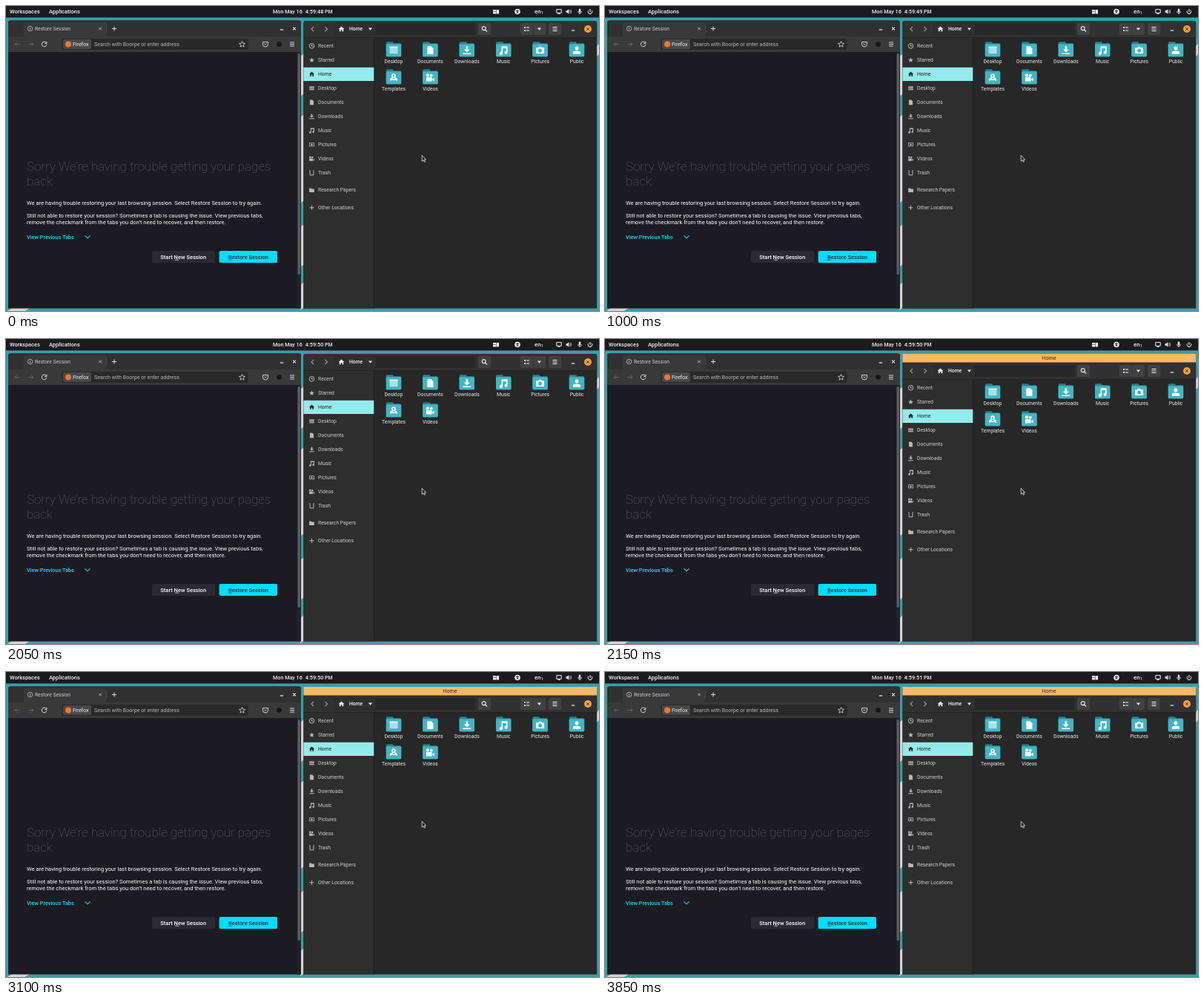
Recreate the animation shown at these times as an HTML page with a canvas. Size 800 by 411 pixels, loop 4.5 s.

```html
<!DOCTYPE html>
<html lang="en">
<head>
<meta charset="utf-8">
<title>Desktop with stacking windows</title>
<style>
html, body { margin: 0; width: 100%; height: 100%; overflow: hidden; background: #1b1a1c; }
canvas { display: block; }
</style>
</head>
<body>
<canvas id="stage" width="800" height="411"></canvas>
<script>
const ctx = document.getElementById('stage').getContext('2d');
const LOOP = 4500;
const STACK_AT = 2150;
const TAB_HEIGHT = 12;
const BOTTOM = 407.6, LEFT = 401.4, RIGHT = 797.2;
const WHITE = '#f2f2f2', SOFT = '#c9c9c9', TEAL = '#3a9dab', PALE = '#d3d3d4', CYAN = '#00ddff';
const BUTTON = '#414141', SIDEBAR = '#2e2e2e';

function rect(x, y, w, h, color, radius = 0) {
  ctx.fillStyle = color;
  ctx.beginPath();
  ctx.roundRect(x, y, w, h, radius);
  ctx.fill();
}

function disc(x, y, r, color) {
  ctx.fillStyle = color;
  ctx.beginPath();
  ctx.arc(x, y, r, 0, Math.PI * 2);
  ctx.fill();
}

function text(str, x, y, size, color, weight = 400, align = 'left') {
  ctx.font = `${weight} ${size}px Roboto, sans-serif`;
  ctx.textAlign = align;
  ctx.textBaseline = 'alphabetic';
  ctx.fillStyle = color;
  ctx.fillText(str, x, y);
}

// Paths are drawn around their own centre.
function at(x, y, draw) {
  ctx.save();
  ctx.translate(x, y);
  draw();
  ctx.restore();
}

function solid(path, x, y, color, scale = 1) {
  at(x, y, () => {
    ctx.scale(scale, scale);
    ctx.fillStyle = color;
    ctx.fill(new Path2D(path), 'evenodd');
  });
}

function line(path, x, y, color, width = 1) {
  at(x, y, () => {
    ctx.strokeStyle = color;
    ctx.lineWidth = width;
    ctx.stroke(new Path2D(path));
  });
}

const shapes = {
  home: 'M0 -4L4.2 0H3V3.6H1V1H-1V3.6H-3V0H-4.2Z',
  star: 'M0 -4L1.2 -1.3L4 -1.1L1.8 .8L2.5 3.6L0 2.1L-2.5 3.6L-1.8 .8L-4 -1.1L-1.2 -1.3Z',
  list: 'M-4 -3H4V-1.6H-4ZM-4 -.8H4V.6H-4ZM-4 1.4H4V3H-4Z',
  page: 'M-3 -4H.8L3 -1.8V4H-3Z',
  download: 'M-1 -4H1V-.8H3L0 2L-3 -.8H-1ZM-4 2.8H4V4H-4Z',
  music: 'M-2 -4L4 -4V2A1.5 1.5 0 1 1 2.8 .7V-2H-.8V3A1.6 1.6 0 1 1 -2 1.6Z',
  picture: 'M-4 -3H4V3H-4ZM-3 -2V2H3V-2ZM0 -1.5A1.5 1.5 0 1 0 .01 -1.5Z',
  camera: 'M-4 -2.6H-1.8L-1 -3.6H1L1.8 -2.6H4V3.2H-4ZM0 -1.6A1.9 1.9 0 1 0 .01 -1.6Z',
  video: 'M-4 -.5H1.6V3.6H-4ZM2 1.3L4 0V3.4L2 2.2ZM-2.5 -4A1.6 1.6 0 1 0 -2.49 -4ZM1 -3.6A1.4 1.4 0 1 0 1.01 -3.6Z',
  folder: 'M-4 -3.2H-.8L.2 -2.2H4V3.2H-4Z',
  person: 'M0 -4A1.9 1.9 0 1 0 .01 -4ZM-3.8 3.8V2.3Q-3.8 .6 0 .6Q3.8 .6 3.8 2.3V3.8Z',
  down: 'M-2.6 -1.4H2.6L0 1.8Z',
  chevronLeft: 'M1.5 -3L-1.5 0L1.5 3',
  chevronRight: 'M-1.5 -3L1.5 0L-1.5 3',
  cross: 'M-1.8 -1.8L1.8 1.8M1.8 -1.8L-1.8 1.8',
  plus: 'M-3 0H3M0 -3V3',
  menu: 'M-3 -2.5H3M-3 0H3M-3 2.5H3',
  minus: 'M-2.2 0H2.2',
  clock: 'M3.3 0A3.3 3.3 0 1 1 0 -3.3A3.3 3.3 0 0 1 3.3 0M0 -2V.3H2',
  trash: 'M-3.4 -3H-2.4V3H2.4V-3H3.4',
  lens: 'M-.8 -3.4A2.5 2.5 0 1 0 -.79 -3.4M1 1L3.6 3.6',
  compass: 'M0 -4.6A2.1 2.1 0 1 0 .01 -4.6M-1.2 -.6L-4.6 3.8M1.2 -.6L4.6 3.8M-4.6 1.4Q0 3.8 4.6 1.4'
};

function wallpaper() {
  rect(0, 0, 800, 411, TEAL);
  solid('M0 0H24L14 6H-10Z', 10, 406, PALE);
  for (const [y, h] of [[64, 54], [146, 116], [294, 54], [372, 34]]) {
    solid(`M-2 4L3 0V${h}L-2 ${h + 4}Z`, 399, y, PALE);
  }
  solid('M0 4L4 0V14L0 18Z', 797, 50, PALE);
}

function topBar(second) {
  rect(0, 0, 800, 15.5, '#1b1a1c');
  text('Workspaces', 5, 10, 7.4, WHITE, 500);
  text('Applications', 58, 10, 7.5, WHITE, 500);
  text('Mon May 16', 360, 10, 7.2, WHITE, 500);
  text(`4:59:${second}`, 403.7, 10, 7.3, WHITE, 500);
  text('PM', 430, 10, 6.9, WHITE, 500);

  rect(657, 5, 4, 2.5, WHITE);
  rect(657, 8, 4, 2.5, WHITE);
  rect(661.5, 5, 3.5, 5.5, WHITE);
  disc(690, 7.5, 3.8, WHITE);
  line('M-2.2 -.9H2.2M0 -2.4V.8M0 .5L-1.3 2.5M0 .5L1.3 2.5', 690, 7.5, '#1b1a1c', .9);
  text('en', 713, 10, 7.8, WHITE, 500);
  text('1', 721.8, 11.3, 5, WHITE, 500);
  line('M-3.2 -2.7H3.2V2H-3.2ZM-1.5 3.2H1.5', 746, 7.3, WHITE);
  solid('M-3.5 -1.2H-2L.3 -3.2V3.2L-2 1.2H-3.5Z', 759, 7.5, WHITE);
  line('M1.5 -1.8Q2.8 0 1.5 1.8M2.7 -2.8Q4.8 0 2.7 2.8', 759, 7.5, WHITE, .7);
  rect(772.7, 3.6, 2.6, 5, WHITE, 1.3);
  line('M-2.4 0Q-2.4 2.4 0 2.4Q2.4 2.4 2.4 0M0 2.4V4', 774, 7.3, WHITE, .8);
  line('M-1.8 -2A2.8 2.8 0 1 0 1.8 -2M0 -3.6V0', 788, 7.7, WHITE);
}

function browser() {
  rect(3, 19.6, 395, BOTTOM - 19.6, '#1c1b22', [3, 3, 0, 0]);
  rect(3, 19.6, 395, 22, '#303030', [3, 3, 0, 0]);
  rect(24, 22, 111, 19, '#393939', 2);
  rect(3, 41, 395, 21, '#393939');
  line('M3.2 0A3.2 3.2 0 1 1 0 -3.2A3.2 3.2 0 0 1 3.2 0M0 -.5V1.8M0 -1.8V-1', 32.5, 30.5, SOFT, .8);
  text('Restore Session', 39, 33, 6.7, SOFT);
  line(shapes.cross, 127, 30.5, SOFT, .8);
  rect(135, 25, 1, 11, '#484848');
  line(shapes.plus, 146, 30.5, '#dedede');
  line(shapes.minus, 372, 32, WHITE, 1.2);
  line(shapes.cross, 389, 30.5, WHITE, 1.2);

  line('M3.5 0H-3.5M-.5 -3L-3.5 0L-.5 3', 15.5, 51.5, '#676767', .9);
  line('M-3.5 0H3.5M.5 -3L3.5 0L.5 3', 33.5, 51.5, '#676767', .9);
  line('M2.4 -2.4A3.3 3.3 0 1 0 3.3 .4M3.4 -3.6V-1H.8', 51.5, 51.5, '#dedede');

  rect(75.5, 44, 251, 15, '#292929', 2);
  rect(77, 45, 38, 13, '#484848', 2);
  disc(84, 51.5, 4, '#f4742b');
  text('Firefox', 90, 54, 7, WHITE);
  text('Search with Boorpe or enter address', 119, 54, 7.13, '#b5b5b5');
  line(shapes.star, 318.5, 51.5, '#dedede', .8);
  line('M-3.5 -3H3.5V0A3.5 3.5 0 0 1 -3.5 0ZM-1.7 -1L0 .7L1.7 -1', 350, 51.5, '#dedede', .9);
  disc(368.5, 51.5, 3.3, '#151515');
  line(shapes.menu, 386, 51.5, '#dedede');

  text('Sorry We\u2019re having trouble getting your pages', 28, 222, 16.95, '#606068', 100);
  text('back', 28, 242, 16.95, '#606068', 100);

  const body = '#fbfbfe';
  text('We are having trouble restoring your last browsing session. Select Restore Session to try again.', 28, 268, 7.55, body);
  text('Still not able to restore your session? Sometimes a tab is causing the issue. View previous tabs,', 28, 285, 7.55, body);
  text('remove the checkmark from the tabs you don\u2019t need to recover, and then restore.', 28, 294, 7.55, body);
  text('View Previous Tabs', 28, 313.5, 7.3, CYAN, 500);
  line('M-3.5 -1.7L0 1.8L3.5 -1.7', 110, 311, CYAN, 1.1);

  rect(197, 330, 85, 16, '#2b2a33', 2);
  text('Start New Session', 239.2, 340.7, 7.5, body, 500, 'center');
  rect(228, 341.8, 5, .7, body);
  rect(287.6, 330, 78.4, 16, CYAN, 2);
  text('Restore Session', 327, 340.7, 7.45, '#2b2a33', 500, 'center');
  rect(300, 341.8, 4.5, .7, '#2b2a33');

  rect(392.5, 62, 5.5, BOTTOM - 62, '#222127');
  rect(393.5, 64, 3.5, 298, '#5b5b60', 1.7);
}

const places = [
  ['Recent', 'clock', 53.5], ['Starred', 'star', 72.5], ['Home', 'home', 91.5],
  ['Desktop', 'list', 110.5], ['Documents', 'page', 129.5], ['Downloads', 'download', 148.5],
  ['Music', 'music', 167.5], ['Pictures', 'picture', 186.5], ['Videos', 'video', 205.5],
  ['Trash', 'trash', 224.5], ['Research Papers', 'folder', 248], ['Other Locations', 'plus', 271.5]
];
const outlined = new Set(['clock', 'trash', 'plus', 'compass']);

const folders = [
  ['Desktop', 'list'], ['Documents', 'page'], ['Downloads', 'download'], ['Music', 'music'],
  ['Pictures', 'camera'], ['Public', 'person'], ['Templates', 'compass'], ['Videos', 'video']
];

function folder(name, icon, x, y) {
  rect(x - 10.2, y - 10, 10, 8, '#27808e', 1.5);
  rect(x - 10.2, y - 8, 20.4, 18, '#2b8997', 1.5);
  rect(x - 10.2, y - 7, 20.4, 17, '#43b5c4', 1.5);
  if (icon === 'list') {
    rect(x - 5.5, y - 3.5, 11, 9.5, '#a9dfe6');
    rect(x - 5.5, y - 3.5, 11, 1.6, '#e9f7f9');
  } else if (outlined.has(icon)) {
    line(shapes[icon], x, y + 1.5, '#fff', 1.7);
  } else {
    solid(shapes[icon], x, y + 1.5, '#fff', 1.35);
  }
  text(name, x, y + 19, 6.8, '#e8e8e8', 400, 'center');
}

function fileHeader() {
  rect(LEFT, 20, RIGHT - LEFT, 22, '#313131', [3, 3, 0, 0]);
  line(shapes.chevronLeft, 413.5, 31, '#999999', 1.1);
  line(shapes.chevronRight, 432, 31, '#999999', 1.1);
  rect(443.5, 23, 190, 16, '#272727', 2);
  rect(444, 23.5, 55, 15, '#2f2f2f', 2);
  solid(shapes.home, 452.5, 31, WHITE, .9);
  text('Home', 463, 33.2, 6.8, WHITE, 500);
  solid(shapes.down, 491.5, 31, WHITE);
  rect(637, 23, 17, 16, BUTTON, 2);
  line(shapes.lens, 645.5, 31, WHITE, 1.1);
  rect(694, 23, 34, 16, BUTTON, 2);
  rect(699, 28, 2, 2, WHITE);
  rect(699, 32, 2, 2, WHITE);
  rect(702, 28.5, 4, 1, WHITE);
  rect(702, 32.5, 4, 1, WHITE);
  rect(711, 23, .6, 16, '#333333');
  solid(shapes.down, 719.5, 31, WHITE);
  rect(732, 23, 17, 16, BUTTON, 2);
  line(shapes.menu, 740.5, 31, WHITE);
  line(shapes.minus, 765, 33, WHITE, 1.2);
  disc(785, 31, 5, '#f6a037');
  line(shapes.cross, 785, 31, '#5b3a10', 1);
}

function files(stacked) {
  const drop = stacked ? TAB_HEIGHT : 0;
  const paneHeight = BOTTOM - 42 - drop;
  rect(LEFT, 20, RIGHT - LEFT, BOTTOM - 20, '#272727', [3, 3, 0, 0]);
  ctx.save();
  ctx.translate(0, drop);
  rect(LEFT, 42, 496 - LEFT, paneHeight, SIDEBAR);
  rect(496, 42, 1, paneHeight, '#1f1f1f');
  fileHeader();
  rect(LEFT, 42, RIGHT - LEFT, .8, '#202020');
  rect(LEFT, 82.7, 496.3 - LEFT, 18.2, '#94ebeb');
  for (const [name, icon, y] of places) {
    const active = name === 'Home';
    const color = active ? '#202020' : '#b8b8b8';
    if (outlined.has(icon)) line(shapes[icon], 412.5, y + .3, color);
    else solid(shapes[icon], 412.5, y + .3, color, .85);
    text(name, 421, y + 2.4, 6.8, active ? '#202020' : '#cdcdcd');
  }
  folders.forEach(([name, icon], i) => {
    folder(name, icon, 523 + (i % 6) * 49.4, i < 6 ? 58.2 : 95.2);
  });
  ctx.restore();
  if (stacked) {
    rect(LEFT, 20, RIGHT - LEFT, 11.5, '#fab869');
    text('Home', 599, 28.2, 7.2, '#33261a', 400, 'center');
  }
}

function pointer() {
  const path = 'M0 0V8L1.9 6.3L3.1 9L4.4 8.4L3.2 5.8H5.3Z';
  solid(path, 561.2, 201.2, '#151515');
  line(path, 561.2, 201.2, '#eeeeee', .8);
}

function draw() {
  const t = performance.now() % LOOP;
  const second = 48 + [550, 2050, 3550].filter(start => t >= start).length;
  wallpaper();
  topBar(second);
  browser();
  files(t >= STACK_AT);
  pointer();
  requestAnimationFrame(draw);
}
draw();
</script>
</body>
</html>
```
